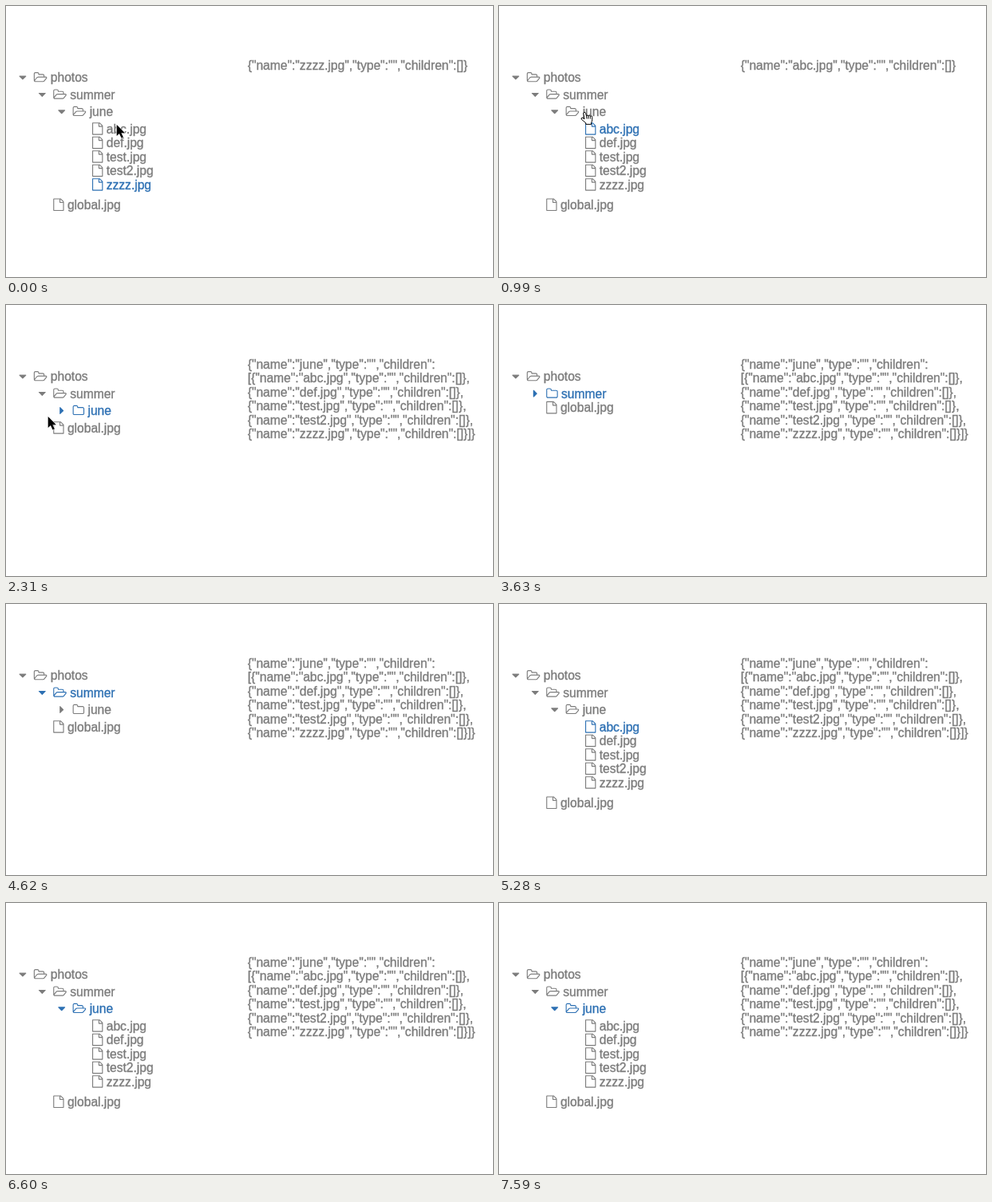
An HTML page with a canvas for the animation above (7.92 s loop, 610x340 px).

```html
<!DOCTYPE html>
<html lang="en">
<head>
<meta charset="utf-8">
<title>File tree</title>
<style>
  html, body { margin: 0; width: 100%; height: 100%; overflow: hidden; background: #fff; }
  canvas { display: block; width: 610px; height: 340px; }
</style>
</head>
<body>
<canvas></canvas>
<script>
const WIDTH = 610, HEIGHT = 340;
const TICK = 330, TICKS = 24;
const EM = 15.6, LINE = 17.5, GAP = 3.9, INDENT = 24.4;
const GRAY = '#7c7c7c', BLUE = '#2d70b3';

const canvas = document.querySelector('canvas');
const ctx = canvas.getContext('2d');
const scale = window.devicePixelRatio || 1;
canvas.width = WIDTH * scale;
canvas.height = HEIGHT * scale;

const leaf = name => ({ name, type: '', children: [] });
const june = {
  name: 'june', type: '',
  children: ['abc.jpg', 'def.jpg', 'test.jpg', 'test2.jpg', 'zzzz.jpg'].map(leaf)
};
const summer = { name: 'summer', type: '', children: [june] };
const photos = { name: 'photos', type: '', children: [summer, leaf('global.jpg')] };
const [abc, , , , zzzz] = june.children;

// Glyph outlines: 1792 units per em, y up from the baseline.
const glyph = (width, path) => ({ width: width / 1792 * EM, path: new Path2D(path) });
const icons = {
  file: glyph(1536, 'M1468 1156q28-28 48-76t20-88v-1152q0-40-28-68t-68-28h-1344q-40 0-68 28t-28 68v1600q0 40 28 68t68 28h896q40 0 88-20t76-48zM1024 1400v-376h376q-10 29-22 41l-313 313q-12 12-41 22zM1408-128v1024h-416q-40 0-68 28t-28 68v416h-768v-1536h1280z'),
  closed: glyph(1664, 'M1536 224v704q0 40-28 68t-68 28h-704q-40 0-68 28t-28 68v64q0 40-28 68t-68 28h-320q-40 0-68-28t-28-68v-960q0-40 28-68t68-28h1216q40 0 68 28t28 68zM1664 928v-704q0-92-66-158t-158-66h-1216q-92 0-158 66t-66 158v960q0 92 66 158t158 66h320q92 0 158-66t66-158v-32h672q92 0 158-66t66-158z'),
  open: glyph(1920, 'M1781 605q0 35-53 35h-1088q-40 0-85.5-21.5t-71.5-52.5l-294-363q-18-24-18-40 0-35 53-35h1088q40 0 86 22t71 53l294 363q18 22 18 39zM640 768h768v160q0 40-28 68t-68 28h-576q-40 0-68 28t-28 68v64q0 40-28 68t-68 28h-320q-40 0-68-28t-28-68v-853l256 315q44 53 116 87.5t140 34.5zM1909 605q0-62-46-120l-295-363q-43-53-116-87.5t-140-34.5h-1088q-92 0-158 66t-66 158v960q0 92 66 158t158 66h320q92 0 158-66t66-158v-32h544q92 0 158-66t66-158v-160h192q54 0 99-24.5t67-70.5q15-32 15-68z'),
  caretDown: glyph(1024, 'M1024 832q0-26-19-45l-448-448q-19-19-45-19t-45 19l-448 448q-19 19-19 45t19 45 45 19h896q26 0 45-19t19-45z'),
  caretRight: glyph(576, 'M576 640q0-26-19-45l-448-448q-19-19-45-19t-45 19-19 45v896q0 26 19 45t45 19 45-19l448-448q19-19 19-45z')
};

const cursors = {
  arrow: { fill: '#000', stroke: '#fff', path: new Path2D('M0 0v14l3.2-3 2.6 5.6 2.4-1.1-2.6-5.3h4.4z') },
  hand: { fill: '#fff', stroke: '#000', path: new Path2D('M5 9.4L3.8 2.6a1.4 1.4 0 0 1 2.8-.6L7.6 6a1.2 1.2 0 0 1 2.4 0 1.2 1.2 0 0 1 2.4.4 1.1 1.1 0 0 1 2.3.5v3.4q0 2-1.2 3.6v2H6.8v-1.6L1.2 9.6q-.7-1.9 1.3-1.9zM7.6 6l.4 3M10 6.2V9M12.4 6.7V9') }
};

// Each entry changes part of the state from its tick onward.
const steps = [
  { tick: 0, selected: zzzz, shown: zzzz, closed: [], cursor: ['arrow', 138.7, 149] },
  { tick: 1, cursor: ['hand', 133.5, 149] },
  { tick: 2, selected: abc, shown: abc },
  { tick: 3, cursor: ['hand', 102, 132.5] },
  { tick: 4, selected: june, shown: june },
  { tick: 6, closed: [june], cursor: ['hand', 64, 131] },
  { tick: 7, cursor: ['arrow', 52.7, 140] },
  { tick: 10, cursor: ['arrow', 60, 202] },
  { tick: 11, selected: summer, closed: [june, summer], cursor: null },
  { tick: 12, selected: photos, closed: [june, summer, photos] },
  { tick: 13, closed: [june, summer] },
  { tick: 14, selected: summer, closed: [june] },
  { tick: 15, selected: june, closed: [] },
  { tick: 16, selected: abc },
  { tick: 17, shown: abc },
  { tick: 20, selected: june, shown: june }
];

const stateAt = tick => Object.assign({}, ...steps.filter(step => step.tick <= tick));

function drawIcon(icon, x, baseline) {
  ctx.save();
  ctx.translate(x, baseline);
  ctx.scale(EM / 1792, -EM / 1792);
  ctx.fill(icon.path, 'evenodd');
  ctx.restore();
}

// A hairline outline gives the text its slightly heavier weight.
function drawText(text, x, baseline) {
  const y = Math.round(baseline);
  ctx.strokeStyle = ctx.fillStyle;
  ctx.lineWidth = 0.35;
  ctx.fillText(text, x, y);
  ctx.strokeText(text, x, y);
}

// Draws a node with its open children; returns the next free baseline.
function drawNode(node, depth, baseline, state) {
  const isFolder = node.children.length > 0;
  const isOpen = isFolder && !state.closed.includes(node);
  const icon = icons[isOpen ? 'open' : isFolder ? 'closed' : 'file'];
  const x = 34.8 + depth * INDENT;

  ctx.fillStyle = node === state.selected ? BLUE : GRAY;
  if (isFolder) {
    const caret = isOpen ? icons.caretDown : icons.caretRight;
    drawIcon(caret, x - 13.9 - caret.width / 2, baseline);
  }
  drawIcon(icon, x, baseline);
  drawText(node.name, x + icon.width + 0.278 * EM, baseline);

  let next = baseline + LINE;
  if (!isOpen) return next;
  next += GAP;
  for (const child of node.children) next = drawNode(child, depth + 1, next, state);
  return next + GAP;
}

function drawJson(node) {
  ctx.fillStyle = GRAY;
  JSON.stringify(node).split(/(?<=:)(?=\[\{)|(?<=\},)/)
    .forEach((line, i) => drawText(line, 302.7, 79.9 + i * LINE));
}

function drawCursor([kind, x, y]) {
  const { fill, stroke, path } = cursors[kind];
  ctx.save();
  ctx.translate(x, y);
  ctx.fillStyle = fill;
  ctx.strokeStyle = stroke;
  ctx.lineWidth = 1;
  ctx.lineJoin = 'round';
  ctx.fill(path);
  ctx.stroke(path);
  if (kind === 'arrow') ctx.fill(path);
  ctx.restore();
}

function draw() {
  const state = stateAt(Math.floor(performance.now() / TICK) % TICKS);
  ctx.setTransform(scale, 0, 0, scale, 0, 0);
  ctx.fillStyle = '#fff';
  ctx.fillRect(0, 0, WIDTH, HEIGHT);
  ctx.font = `${EM}px "Liberation Sans", Arial, sans-serif`;
  drawNode(photos, 0, 95.3, state);
  drawJson(state.shown);
  if (state.cursor) drawCursor(state.cursor);
  requestAnimationFrame(draw);
}
draw();
</script>
</body>
</html>
```
